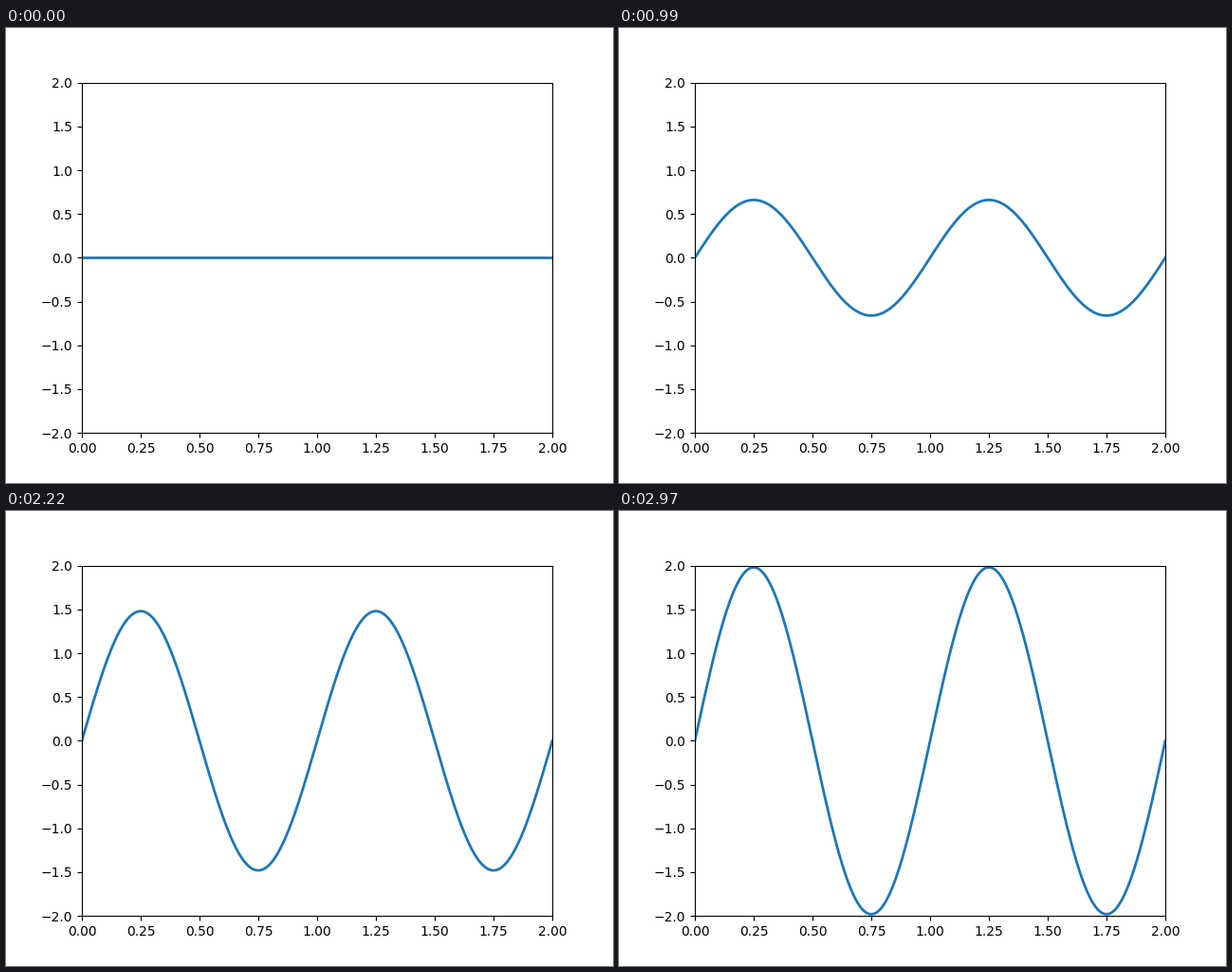
A matplotlib script for the animation above (3 s loop, 640 by 480 pixels).

```python
import numpy as np
import matplotlib.pyplot as plt
from matplotlib.animation import FuncAnimation

FRAMES = 100
INTERVAL = 30  # ms
MAX_AMP = 2.0

fig, ax = plt.subplots(figsize=(6.4, 4.8), dpi=100)
ax.set_xlim(0, 2)
ax.set_ylim(-2, 2)

x = np.linspace(0, 2, 1000)
wave = np.sin(2 * np.pi * x)
line, = ax.plot(x, 0 * wave, lw=2)


def update(i):
    """Grow the sine wave's amplitude linearly."""
    line.set_ydata(MAX_AMP * i / FRAMES * wave)
    return line,


anim = FuncAnimation(fig, update, frames=FRAMES, interval=INTERVAL,
                     repeat=True, repeat_delay=0)

plt.show()
```
